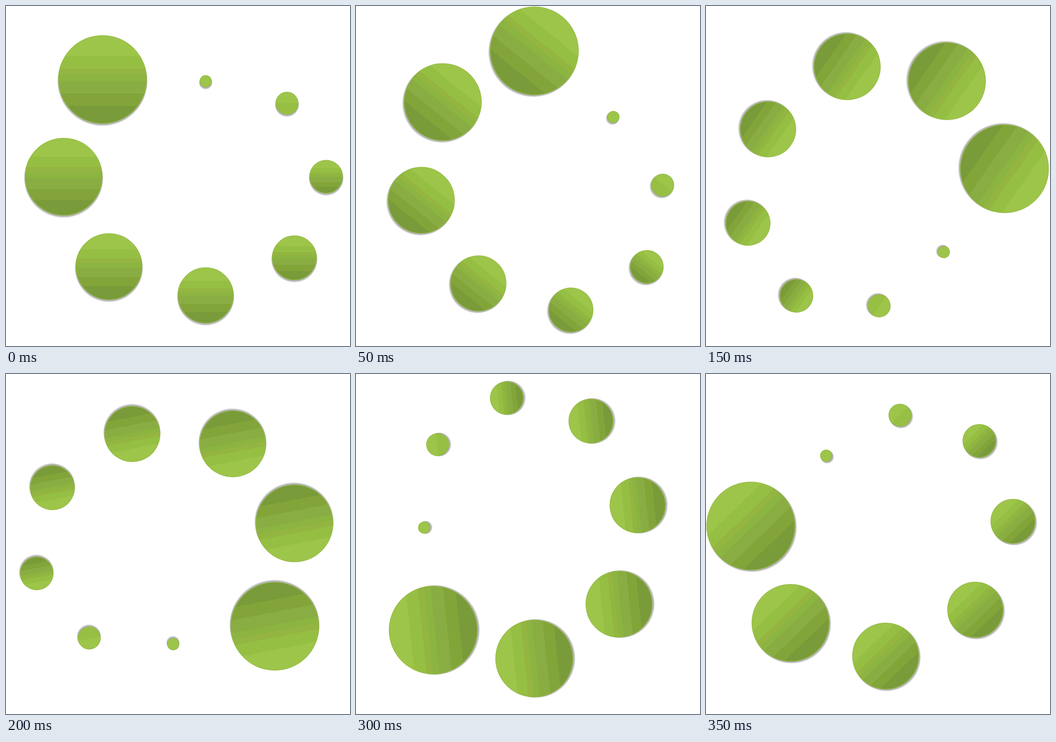
An HTML page that plays this animation: 752x745 px, repeating every 0.4 s.

```html
<!DOCTYPE html>
<html lang="en">
<head>
<meta charset="utf-8">
<title>Spinner</title>
<style>
  html, body { margin: 0; width: 100%; height: 100%; overflow: hidden; background: #fff; }
  svg { display: block; }
</style>
</head>
<body>
<svg width="752" height="745" viewBox="0 0 752 745">
  <defs>
    <linearGradient id="full" x2="0" y2="1"></linearGradient>
    <linearGradient id="light" x2="0" y2="1"></linearGradient>
  </defs>
  <g id="ring"></g>
</svg>
<script>
const STEP = 50;

// Dot centres relative to the ring's centroid: x, y, radius, fill
const dots = [
  [-211.4, -219.5, 97, 'full'],
  [-296.4, -6.4, 85, 'full'],
  [-197.4, 190.4, 73, 'full'],
  [14.1, 253.5, 61.2, 'full'],
  [208, 171.3, 49, 'full'],
  [277.5, -6.5, 36.7, 'full'],
  [191.8, -167.4, 25, 'light'],
  [14.1, -215.7, 13.2, 'flat']
];

// The wobbling spin: angle and centroid position for each step
const poses = [
  [0, 422.4, 380.5],
  [39, 416.1, 401.9],
  [82, 379.1, 415.5],
  [125, 351.5, 404],
  [169, 338.3, 377.6],
  [213, 325.9, 347.7],
  [264, 365, 328],
  [316, 402.4, 344]
];

const ring = document.getElementById('ring');

function add(parent, name, attributes) {
  const node = document.createElementNS('http://www.w3.org/2000/svg', name);
  for (const key in attributes) node.setAttribute(key, attributes[key]);
  parent.append(node);
}

// Each band is a flat colour that ends at the given offset
function addBands(id, bands) {
  let start = 0;
  for (const [color, end] of bands) {
    for (const offset of [start, end]) {
      add(document.getElementById(id), 'stop', { offset, 'stop-color': color });
    }
    start = end;
  }
}

addBands('full', [
  ['#9dc54a', 0.237], ['#95bf42', 0.375], ['#94b541', 0.445],
  ['#8cb440', 0.52], ['#89ad42', 0.66], ['#82a439', 0.8], ['#799b39', 1]
]);
addBands('light', [['#9dc54a', 0.48], ['#96bf44', 1]]);

for (const [cx, cy, r, fill] of dots) {
  for (const [drop, grow, color] of [[3.6, 1.2, '#e2e2e4'], [3, 0.7, '#c9c9cb'], [2, 0.3, '#b0b1ae']]) {
    add(ring, 'circle', { cx, cy: cy + drop, r: r + grow, fill: color });
  }
  add(ring, 'circle', {
    cx, cy, r: r - 0.6,
    fill: fill === 'flat' ? '#9dc54a' : `url(#${fill})`,
    stroke: '#94b942', 'stroke-width': 1.2
  });
}

function draw(now) {
  const [angle, x, y] = poses[Math.floor(now / STEP) % poses.length];
  ring.setAttribute('transform', `translate(${x} ${y}) rotate(${angle})`);
}

const origin = performance.now();
function tick() {
  draw(performance.now() - origin);
  requestAnimationFrame(tick);
}
tick();
</script>
</body>
</html>
```
